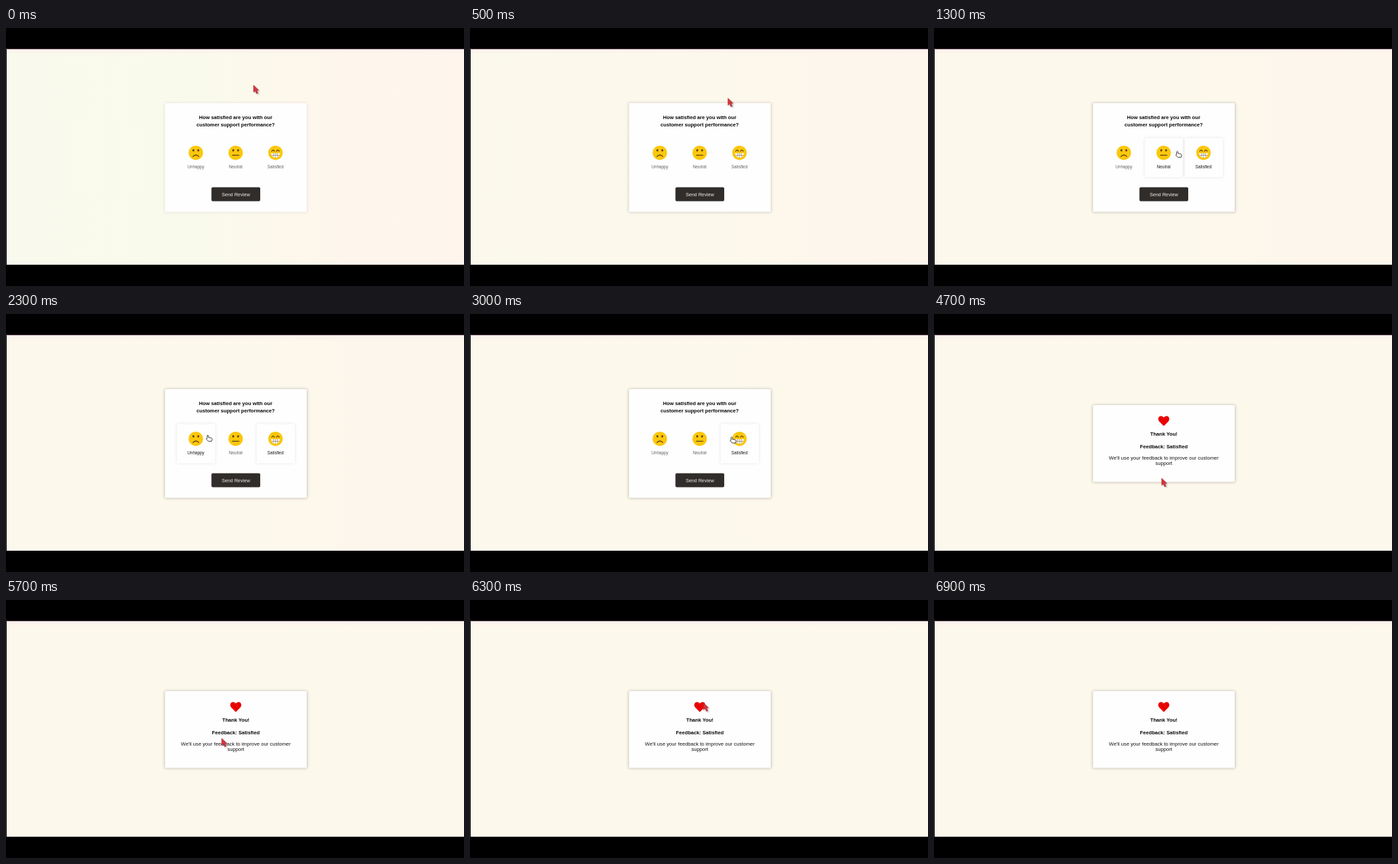
Recreate the animation shown at these times as an HTML page. Size 690 by 388 pixels, loop 7.1 s.

```html
<!DOCTYPE html>
<html lang="en">
<head>
<meta charset="utf-8">
<title>Feedback card</title>
<style>
  html, body { margin: 0; width: 100%; height: 100%; overflow: hidden; background: #000; }
  svg { display: block; width: 100vw; height: 100vh; }
  text { font: 7.65px "Liberation Sans", Arial, sans-serif; text-anchor: middle; fill: #151515; }
  .bold { font-weight: 700; fill: #080808; }
  .small { font-size: 6.37px; }
  .card { fill: #fefefe; }
  .face { fill: #fbc70d; }
  .ink { fill: none; stroke: #5d4410; stroke-width: 1.3; stroke-linecap: round; }
</style>
</head>
<body>
<svg viewBox="0 0 690 388" preserveAspectRatio="none">
  <defs>
    <linearGradient id="tint">
      <stop offset="0" stop-color="#f9faed"/>
      <stop offset=".45" stop-color="#fafaec"/>
      <stop offset=".72" stop-color="#fef6ec"/>
      <stop offset="1" stop-color="#fff5ed"/>
    </linearGradient>
    <linearGradient id="blush">
      <stop offset=".6" stop-color="#fff4ec" stop-opacity="0"/>
      <stop offset=".75" stop-color="#fff4ec" stop-opacity=".7"/>
    </linearGradient>
    <linearGradient id="topGlow" x2="0" y2="1">
      <stop offset="0" stop-color="#fbeeee"/>
      <stop offset="1" stop-color="#fdf8ec" stop-opacity="0"/>
    </linearGradient>
    <filter id="soft" x="-20%" y="-20%" width="140%" height="140%"><feGaussianBlur stdDeviation="2"/></filter>
    <filter id="haze" x="-50%" y="-50%" width="200%" height="200%"><feGaussianBlur stdDeviation=".8"/></filter>
  </defs>

  <rect width="690" height="388"/>
  <rect x="1" y="32" width="689" height="324" fill="#fdf8ec"/>
  <rect id="warm" x="1" y="32" width="689" height="324" fill="url(#blush)"/>
  <rect id="cool" x="1" y="32" width="689" height="324" fill="url(#tint)"/>
  <rect x="1" y="32" width="689" height="10" fill="url(#topGlow)"/>
  <rect y="31" width="690" height="1" fill="#5b4650"/>

  <g id="survey">
    <rect id="shade" x="239" y="113" width="214.5" height="164" fill="#8c8678" opacity=".55" filter="url(#soft)"/>
    <rect class="card" x="239.5" y="113" width="213.5" height="163.5" rx="1.5"/>
    <text class="bold" x="346" y="137">How satisfied are you with our</text>
    <text class="bold" x="346" y="148">customer support performance?</text>
    <g id="ratings"></g>
    <g id="button">
      <rect x="309.5" y="239.5" width="73.5" height="21" rx="2" fill="#302d2b"/>
      <text x="346.3" y="252.5" style="font-size:7.25px;fill:#f1efed">Send Review</text>
    </g>
  </g>

  <g id="thanks">
    <rect x="239" y="137" width="214.5" height="116" fill="#8c8678" opacity=".55" filter="url(#soft)"/>
    <rect class="card" x="239.5" y="137" width="213.5" height="115.5" rx="1.5"/>
    <path fill="#e80303" d="M346.2 168.6 L339.2 161.4 C336.9 158.8 337.8 154.4 341 153.6 C343.2 153 345 154.1 346.2 155.7 C347.4 154.1 349.2 153 351.4 153.6 C354.6 154.4 355.5 158.8 353.2 161.4 Z"/>
    <text class="bold" x="346.2" y="182.5">Thank You!</text>
    <text class="bold" x="346.2" y="201.7">Feedback: Satisfied</text>
    <text x="346.2" y="218.7">We'll use your feedback to improve our customer</text>
    <text x="346.2" y="227.4">support</text>
  </g>

  <g id="arrow">
    <path d="M1.8 1.8V12.3L4.3 10.1L6.4 14.4L8.2 13.6L6.2 9.4L9.4 9.2Z" fill="#777" opacity=".6" filter="url(#haze)"/>
    <path d="M0 0V10.6L2.5 8.4L4.6 12.8L6.4 12L4.4 7.7L7.5 7.4Z" fill="#d8363c" stroke="#a5202c" stroke-width=".6"/>
  </g>
  <path id="hand" fill="#fff" stroke="#2b2b2b" stroke-width=".9" stroke-linejoin="round"
    d="M-1 1Q0 -.7 1 1V3.6L5.4 4.5Q6.8 5 6.5 6.8L5.8 9.4H.8L-2.2 6.2Q-2.2 4.8 -1 5.2Z"/>
</svg>

<script>
const LOOP = 7100, STEP = 100;
const PICKED = 1000, PRESSED = 4500, SENT = 4700, GONE = 6900;
const $ = id => document.getElementById(id);

// Pointer path: time, x, y
const path = [
  [0, 373, 86], [800, 397, 116], [1000, 410, 185], [1100, 409, 187],
  [1300, 366.5, 185], [1700, 325, 187], [2000, 288, 186], [2300, 304, 182],
  [2500, 316, 182], [3100, 405, 185], [3400, 405, 185], [3900, 350.5, 251.5],
  [4300, 343, 247], [5200, 343, 247], [5450, 352, 189], [5700, 325, 208],
  [6000, 327, 212], [6400, 358, 140], [6800, 353, 33]
];

const mouths = [
  '<path class="ink" d="M281.5 193.4Q286 188.6 290.5 193.4"/>',
  '<path class="ink" d="M341 191.3H351"/>',
  '<path d="M399.3 188.2H412.7Q412.3 195 406 195T399.3 188.2Z" fill="#fff"/>' +
  '<path class="ink" style="stroke-width:.5" d="M400.2 191.4H411.8M403 188.4V194M406 188.4V194.8M409 188.4V194"/>'
];

const eyes = (x, smiling) => smiling
  ? `<path class="ink" d="M${x - 5.6} 185.2q2-3.2 4 0m3.2 0q2-3.2 4 0"/>`
  : [-3.7, 3.7].map(d => `<ellipse cx="${x + d}" cy="184" rx="1.5" ry="1.8" fill="#5d4410"/>`).join('');

const ratings = ['Unhappy', 'Neutral', 'Satisfied'].map((name, i) => {
  const x = 286 + 60 * i;
  $('ratings').insertAdjacentHTML('beforeend', `<g>
    <g class="frame">
      <rect x="${x - 28.5}" y="165.5" width="57.5" height="59" rx="2" fill="#999" opacity=".3" filter="url(#soft)"/>
      <rect x="${x - 28.5}" y="165.5" width="57.5" height="59" rx="2" fill="#fefefe"/>
    </g>
    <circle class="face" cx="${x}" cy="187.7" r="10.8"/>
    ${eyes(x, i === 2)}${mouths[i]}
    <text class="small" x="${x}" y="211.2">${name}</text></g>`);
  const g = $('ratings').lastElementChild;
  return { x, frame: g.querySelector('.frame'), label: g.querySelector('text') };
});

const show = (el, on) => el.setAttribute('visibility', on ? 'visible' : 'hidden');
const within = (x, y, l, t, r, b) => x >= l && x <= r && y >= t && y <= b;

function pointer(t) {
  const i = path.findIndex(k => k[0] > t);
  if (i < 0) return path[path.length - 1].slice(1);
  const [t0, x0, y0] = path[i - 1], [t1, x1, y1] = path[i];
  const u = (t - t0) / (t1 - t0), e = (u + u * u * (3 - 2 * u)) / 2;
  return [x0 + (x1 - x0) * e, y0 + (y1 - y0) * e];
}

function draw(time) {
  const t = Math.floor(time % LOOP / STEP) * STEP;
  const [x, y] = pointer(t);
  const asking = t < SENT;
  const settle = Math.min(1, t / 800);

  $('cool').setAttribute('opacity', 1 - settle);
  $('warm').setAttribute('opacity', Math.max(0, Math.min(1, (3300 - t) / 800)) * .6);
  $('shade').setAttribute('opacity', .2 + .35 * settle);
  show($('survey'), asking);
  show($('thanks'), !asking);

  let clickable = asking && within(x, y, 309, 239, 383, 261);
  ratings.forEach((r, i) => {
    const hover = asking && within(x, y, r.x - 28.5, 165, r.x + 29, 224);
    const active = i === 2 && t >= PICKED;
    clickable ||= hover;
    r.frame.setAttribute('opacity', hover || active ? .8 : 0);
    r.label.style.fill = hover || active ? '#161616' : '#636363';
  });

  const s = t >= PRESSED && asking ? .98 : 1;
  $('button').setAttribute('transform', `translate(346.25 250) scale(${s}) translate(-346.25 -250)`);

  for (const id of ['arrow', 'hand']) {
    $(id).setAttribute('transform', `translate(${x} ${y})`);
    show($(id), t < GONE && (id === 'hand') === clickable);
  }
}

const start = performance.now();
function tick() {
  draw(performance.now() - start);
  requestAnimationFrame(tick);
}
tick();
</script>
</body>
</html>
```
